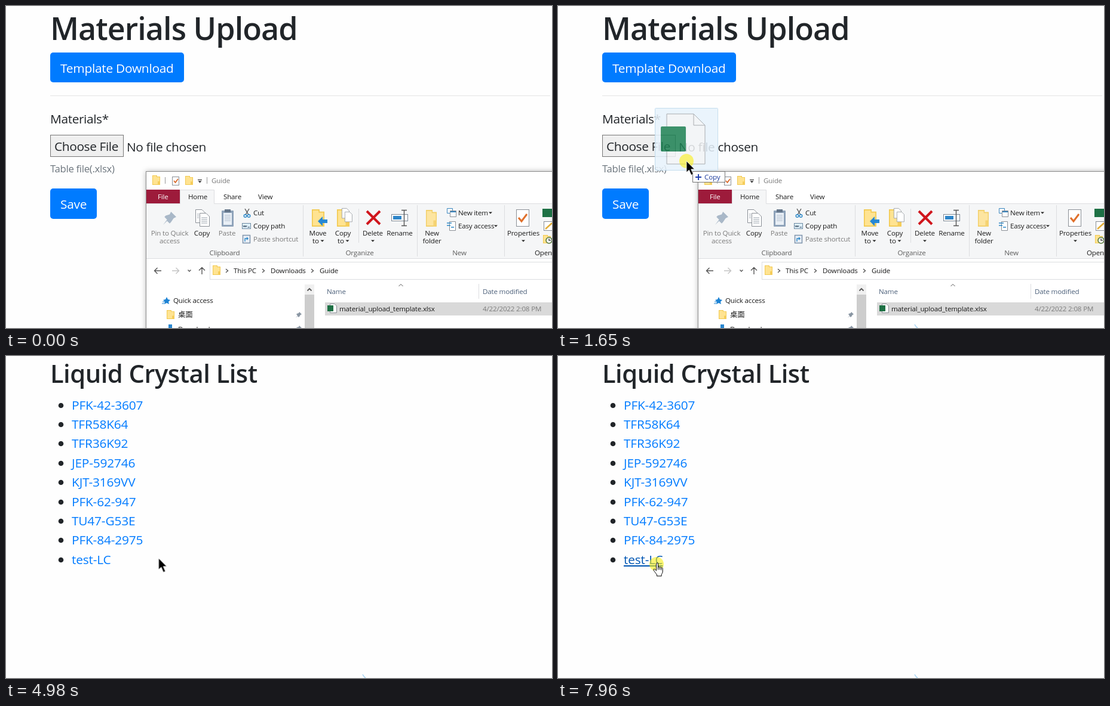
Write an HTML page that moves like this. It is 914x540 px and loops after 8000 ms.

```html
<!DOCTYPE html>
<html lang="en">
<head>
<meta charset="utf-8">
<title>Materials Upload</title>
<style>
  html, body { margin: 0; width: 100%; height: 100%; overflow: hidden; background: #fefefe; }
  svg { display: block; }
  body > svg { width: 100vw; height: 100vh; }
  text { font-family: "Open Sans", "Noto Sans", "Noto Sans CJK SC", "Noto Sans CJK", sans-serif; white-space: pre; }

  .page text { font-size: 20.85px; letter-spacing: -.018em; fill: #212529; }
  .page .title { font-size: 52px; font-weight: 600; }
  .page .subtitle { font-size: 41.7px; font-weight: 600; letter-spacing: -.012em; }
  .page .hint { font-size: 16.7px; fill: #6c757d; }
  .page .label { fill: #fff; letter-spacing: -.012em; }
  .page .link { fill: #007bff; letter-spacing: -.008em; }
  .btn { fill: #007bff; }

  .win text, .tag text { font-size: 11.6px; letter-spacing: -.016em; fill: #1b1b1b; }
  .win .mid { text-anchor: middle; }
  .win .dim { fill: #7b7b7b; }
  .win .group { fill: #5c5c5c; text-anchor: middle; }
  .win .head { fill: #4c607a; }
  .line { fill: none; stroke: #dcdde0; }
  .ink { fill: none; stroke: #555; stroke-width: 1.4; }
  .blue { fill: none; stroke: #2b88c8; stroke-width: 1.4; }
  .sheet { fill: #fff; stroke: #8a8f96; }
  .frame { fill: #fff; stroke: #8b8b8b; filter: drop-shadow(0 0 4px rgba(0, 0, 0, .28)); }

  /* Pointer */
  .pointer { animation: path 8s ease-in-out infinite; }
  @keyframes path {
    0%, 4.1% { transform: translate(598px, 545px); }
    8.375%, 13.1% { transform: translate(580px, 504px); }
    20.6% { transform: translate(215px, 260px); }
    21.5% { transform: translate(218px, 247px); }
    24.1%, 30.7% { transform: translate(233px, 220px); }
    30.71%, 34.75% { transform: translate(232px, 225px); }
    43%, 57.1% { transform: translate(117px, 345px); }
    66.5% { transform: translate(354px, 335px); }
    70% { transform: translate(250px, 368px); }
    74% { transform: translate(150px, 345px); }
    77.1%, 77.75% { transform: translate(181px, 337px); }
    80% { transform: translate(183px, 386px); }
    84% { transform: translate(168px, 345px); }
    85.5% { transform: translate(168px, 312px); }
    87.4% { transform: translate(160px, 335px); }
    91% { transform: translate(150px, 356px); }
    97.75%, 100% { transform: translate(165px, 349px); }
  }

  /* Hard switches */
  .arrow, .hand, .press, .ghost, .tag, .win, .row, .choose, .empty, .chosen,
  .upload, .list, .save, .link1, .link2, .spark { animation: 8s step-end infinite; }
  .arrow { animation-name: arrow; }
  .hand { animation-name: hand; }
  .press { animation-name: press; }
  .ghost { animation-name: ghost; }
  .tag { animation-name: tag; }
  .win, .empty { animation-name: before; }
  .chosen { animation-name: after; }
  .row { animation-name: row; }
  .choose { animation-name: choose; }
  .upload { animation-name: upload; }
  .list { animation-name: list; }
  .save { animation-name: save; }
  .link1 { animation-name: link1; }
  .link2 { animation-name: link2; }
  .spark { animation-name: spark; }
  .ring { animation: ring 8s linear infinite; }

  @keyframes arrow {
    0%, 60.2%, 76.3% { opacity: 1; }
    39.7%, 72.6%, 82.4%, 100% { opacity: 0; }
  }
  @keyframes hand {
    0%, 60.2%, 76.3% { opacity: 0; }
    39.7%, 72.6%, 82.4%, 100% { opacity: 1; }
  }
  @keyframes press {
    0%, 30.7%, 52.1% { opacity: 0; }
    11.85%, 48.7%, 98.6%, 100% { opacity: 1; }
  }
  @keyframes ghost { 0%, 30.7%, 100% { opacity: 0; } 13.6% { opacity: 1; } }
  @keyframes tag { 0%, 100% { opacity: 0; } 18.8% { opacity: 1; } }
  @keyframes before { 0% { opacity: 1; } 30.7%, 100% { opacity: 0; } }
  @keyframes after { 0% { opacity: 0; } 30.7%, 100% { opacity: 1; } }
  @keyframes row {
    0%, 14.3%, 100% { fill: #d9d9d9; stroke: #d9d9d9; }
    6.5% { fill: #cce8ff; stroke: #99d1ff; }
  }
  @keyframes choose {
    0%, 30.7%, 100% { fill: #efefef; stroke: #767676; }
    21.5% { fill: #f5f5f5; stroke: #8d8d8d; }
  }
  @keyframes upload { 0% { opacity: 1; } 57.1%, 100% { opacity: 0; } }
  @keyframes list { 0% { opacity: 0; } 57.1%, 100% { opacity: 1; } }
  @keyframes save { 0% { fill: #007bff; } 39.7%, 100% { fill: #0069d9; } }
  @keyframes ring { 0%, 48.8% { opacity: 0; } 51%, 100% { opacity: 1; } }
  @keyframes link1 {
    0%, 86.6%, 100% { fill: #007bff; text-decoration: none; }
    84.9% { fill: #0056b3; text-decoration: underline; }
  }
  @keyframes link2 {
    0%, 60.2%, 76.3%, 84.9% { fill: #007bff; text-decoration: none; }
    57.1%, 72.6%, 82.4%, 86.6%, 100% { fill: #0056b3; text-decoration: underline; }
  }
  @keyframes spark { 0% { opacity: 0; } 8.4%, 100% { opacity: 1; } }
</style>
</head>
<body>
<svg viewBox="0 0 914 540">
  <defs>
    <symbol id="folder" viewBox="0 0 13 16" preserveAspectRatio="none">
      <path d="M0 0H8V2H13V16H0Z" fill="#f2c94f"/>
      <path d="M1 1H7V3H12V15H1Z" fill="#ffe391"/>
      <path d="M9 10H13V16H9Z" fill="#f5cd5b"/>
    </symbol>
    <path id="down" d="M-3 -1.5H3L0 1.5Z" fill="#222"/>
    <path id="next" d="M-2 -3L1.5 0L-2 3" class="ink"/>
    <path id="pin" d="M1 -5L5 -1L3 0L1 3L0 4L-2 2L-5 5L-2 1L-4 -1L-3 -2L0 -3Z"/>
    <g id="file">
      <path d="M4.500 .5H12L15.500 4V15.500H4.500Z" class="sheet"/>
      <rect y="3" width="10" height="10" fill="#1e7145"/>
    </g>
    <path id="page" d="M.5 .5H11L16.500 6V22.500H.5Z" class="sheet"/>
  </defs>

  <g class="page upload">
    <text class="title" x="74" y="57">Materials Upload</text>
    <rect class="btn" x="74" y="78" width="224" height="50" rx="5"/>
    <text class="label" x="91" y="112">Template Download</text>
    <path d="M74 150.500H911" stroke="#e4e4e4"/>
    <text x="74" y="197">Materials*</text>
    <rect class="choose" x="74.500" y="216.500" width="122" height="36" fill="#efefef" stroke="#767676"/>
    <text x="81" y="243">Choose File</text>
    <text class="empty" x="202" y="244">No file chosen</text>
    <text class="chosen" x="202" y="244">material_upload_template.xlsx</text>
    <text class="hint" x="74" y="279">Table file(.xlsx)</text>
    <rect class="ring" x="69.700" y="301.700" width="86.600" height="59.600" rx="9" fill="#93c7ff"/>
    <rect class="btn save" x="74" y="306" width="78" height="51" rx="5"/>
    <text class="label" x="91" y="340">Save</text>
  </g>

  <g class="page list">
    <text class="subtitle" x="74" y="45">Liquid Crystal List</text>
    <path d="M92 83v0M92 115v0M92 147v0M92 180v0M92 212v0M92 245v0M92 277v0M92 309v0M92 342v0"
      stroke="#212529" stroke-width="8.600" stroke-linecap="round"/>
    <text class="link" x="110" y="90">PFK-42-3607</text>
    <text class="link" x="110" y="122">TFR58K64</text>
    <text class="link" x="110" y="154">TFR36K92</text>
    <text class="link" x="110" y="187">JEP-592746</text>
    <text class="link" x="110" y="219">KJT-3169VV</text>
    <text class="link" x="110" y="252">PFK-62-947</text>
    <text class="link" x="110" y="284">TU47-G53E</text>
    <text class="link link1" x="110" y="316">PFK-84-2975</text>
    <text class="link link2" x="110" y="349">test-LC</text>
  </g>

  <g class="win">
    <rect class="frame" x="234.500" y="277.500" width="720" height="300"/>

    <!-- Title bar -->
    <use href="#folder" x="245" y="284" width="13" height="16"/>
    <path d="M266.500 287V298M336.500 287V298" stroke="#999"/>
    <rect x="278.500" y="286.500" width="11" height="14" class="sheet"/>
    <path d="M281 293L283.500 296L288 290" fill="none" stroke="#d9692a" stroke-width="1.800"/>
    <use href="#folder" x="300" y="285" width="13" height="15"/>
    <path d="M321 291.500H328" stroke="#222"/>
    <use href="#down" x="324.500" y="295"/>
    <text class="dim" x="344" y="297">Guide</text>

    <!-- Tabs -->
    <path d="M235 331H914V424H235Z" fill="#f5f6f7"/>
    <path d="M235 331.500H291.500V308.500H348.500V331.500H914M235 423.500H914" class="line"/>
    <path d="M292 309H348V333H292Z" fill="#f5f6f7"/>
    <path d="M235 308H291V331H235Z" fill="#9d1b3b"/>
    <text x="254" y="324" style="fill:#fff">File</text>
    <text x="305" y="324">Home</text>
    <text x="364" y="324">Share</text>
    <text x="422" y="324">View</text>
    <path d="M497.500 334V420M590.500 340V397M688.500 334V420M834.500 334V420" class="line"/>

    <!-- Clipboard -->
    <use href="#pin" transform="translate(274 356) scale(2.200)" fill="#a9b8c8"/>
    <text class="mid dim" x="274" y="385">Pin to Quick</text>
    <text class="mid dim" x="274" y="398">access</text>
    <use href="#page" x="317" y="341"/>
    <use href="#page" x="324" y="347"/>
    <path d="M320 349H323M320 352H323M320 355H323M327 355H337M327 358H337M327 361H337M327 364H337" stroke="#9aa3ad"/>
    <text class="mid" x="328" y="385">Copy</text>
    <rect x="361" y="343" width="20" height="27" rx="1" fill="#8fa3ba"/>
    <rect x="364" y="347" width="14" height="20" fill="#e9eff6"/>
    <rect x="366" y="341" width="10" height="5" fill="#65768a"/>
    <path d="M366 351H376M366 354H376M366 357H376M366 360H376" stroke="#aebccc"/>
    <text class="mid dim" x="370" y="385">Paste</text>
    <path d="M400 340L406 350M407 340L401 350" class="ink"/>
    <circle cx="400.500" cy="352" r="2.300" class="blue"/>
    <circle cx="406.500" cy="352" r="2.300" class="blue"/>
    <text x="414" y="351">Cut</text>
    <rect x="395.500" y="364.500" width="14" height="9" fill="#dff0fb" stroke="#6f8ba3"/>
    <path d="M397 368L398.500 371L400 368L401.500 371L403 368M404.500 371H408" fill="none" stroke="#24384c"/>
    <text x="414" y="373">Copy path</text>
    <rect x="396.500" y="384.500" width="12" height="13" fill="#e9eff6" stroke="#8095ad" stroke-width="1.500"/>
    <path d="M400 395V390H405M403 388L405 390L403 392" class="blue"/>
    <text class="dim" x="414" y="395">Paste shortcut</text>
    <text class="group" x="366" y="418">Clipboard</text>

    <!-- Organize -->
    <use href="#folder" x="512" y="341" width="21" height="29"/>
    <path d="M522 361L530 353V358H538V364H530V369Z" fill="#2688d4"/>
    <text class="mid" x="522" y="385">Move</text>
    <text x="513" y="398">to</text>
    <use href="#down" x="529.500" y="394"/>
    <use href="#folder" x="554" y="341" width="21" height="29"/>
    <use href="#page" transform="translate(562 339) scale(.75)"/>
    <use href="#page" transform="translate(567 345) scale(.75)"/>
    <text class="mid" x="564" y="385">Copy</text>
    <text x="555" y="398">to</text>
    <use href="#down" x="571.500" y="394"/>
    <path d="M604 344L626 366M626 344L604 366" stroke="#d0151c" stroke-width="4"/>
    <text class="mid" x="614" y="385">Delete</text>
    <use href="#down" x="614" y="394"/>
    <rect x="645.500" y="349.500" width="27" height="11" fill="#fff" stroke="#7c8894"/>
    <rect x="648" y="352" width="14" height="6" fill="#2f86c9"/>
    <path d="M662 342.500H671M662 368.500H671M666.500 342V369" class="ink"/>
    <text class="mid" x="659" y="385">Rename</text>
    <text class="group" x="592" y="418">Organize</text>

    <!-- New -->
    <use href="#folder" x="703" y="342" width="18" height="28" opacity=".85"/>
    <text class="mid" x="713" y="385">New</text>
    <text class="mid" x="713" y="398">folder</text>
    <path d="M738.500 339.500H747.500V347.500H738.500Z" fill="#fff" stroke="#3a86bf"/>
    <path d="M743.500 343.500H753.500V353.500H743.500Z" class="sheet"/>
    <path d="M744 345H753" stroke="#3a86bf" stroke-width="2"/>
    <text x="757" y="351">New item</text>
    <use href="#down" x="811" y="347"/>
    <path d="M742.500 361.500H752.500V376.500H742.500Z" class="sheet"/>
    <path d="M738 364H746M738 368H744M745 371H750" class="blue"/>
    <text x="757" y="373">Easy access</text>
    <use href="#down" x="820" y="369"/>
    <text class="group" x="759" y="418">New</text>

    <!-- Open -->
    <rect x="854.500" y="341.500" width="21" height="28" class="sheet"/>
    <path d="M858 355L863 361L872 349" fill="none" stroke="#e0702c" stroke-width="3"/>
    <text class="mid" x="866" y="385">Properties</text>
    <use href="#down" x="866" y="394"/>
    <rect x="898" y="340" width="16" height="14" fill="#1e7145"/>
    <rect x="900.500" y="361.500" width="14" height="15" class="sheet"/>
    <path d="M903 374L914 364" stroke="#e3ad35" stroke-width="2.500"/>
    <use href="#folder" x="899" y="384" width="13" height="14"/>
    <circle cx="909" cy="393" r="5" fill="#f5f6f7" stroke="#55783b" stroke-width="1.500"/>
    <path d="M909 390V393H912" class="ink"/>
    <text x="885" y="418">Open</text>

    <!-- Address -->
    <path d="M260 444H249M253.500 439L248.500 444L253.500 449M328 450V439M323 443.500L328 438.500L333 443.500" class="ink"/>
    <path d="M278 444H289M284.500 439L289.500 444L284.500 449" class="ink" opacity=".35"/>
    <path d="M304.500 442.500L307 445L309.500 442.500" class="ink"/>
    <rect x="341.500" y="429.500" width="600" height="29" class="line"/>
    <use href="#folder" x="346" y="435" width="13" height="16"/>
    <use href="#next" x="370" y="444"/>
    <text x="381" y="448">This PC</text>
    <use href="#next" x="431" y="444"/>
    <text x="443" y="448">Downloads</text>
    <use href="#next" x="513" y="444"/>
    <text x="525" y="448">Guide</text>

    <!-- Side pane -->
    <path d="M269 488L271 492L275 493L272 496L273 500L269 498L265 500L266 496L263 493L267 492Z" fill="#1d83d4"/>
    <path d="M262 496H266M261 499H265" stroke="#1d83d4"/>
    <text x="280" y="498">Quick access</text>
    <use href="#folder" x="269" y="510" width="13" height="15"/>
    <text x="288" y="522" style="font-size:12.500px">桌面</text>
    <use href="#pin" x="490" y="518" fill="#8a96a3"/>
    <path d="M272 534H278V541H272Z" fill="#2a87d0"/>
    <text x="288" y="546">Downloads</text>
    <use href="#pin" x="490" y="541" fill="#8a96a3"/>
    <path d="M500 467H516V540H500Z" fill="#f0f0f0"/>
    <path d="M500 484H516V540H500Z" fill="#cdcdcd"/>
    <path d="M504.500 477.500L508 474L511.500 477.500" class="ink" style="stroke-width:1.800"/>

    <!-- File list -->
    <text class="head" x="537" y="483">Name</text>
    <path d="M657.500 470L661 466.500L664.500 470" class="ink" style="stroke-width:1"/>
    <path d="M791.500 466V491" class="line"/>
    <text class="head" x="798" y="483">Date modified</text>
    <rect class="row" x="534.500" y="497.500" width="400" height="21" fill="#d9d9d9" stroke="#d9d9d9"/>
    <use href="#file" x="538" y="499"/>
    <text x="558" y="512">material_upload_template.xlsx</text>
    <text class="dim" x="798" y="512">4/22/2022 2:08 PM</text>
  </g>

  <path class="spark" d="M597 534Q599 538 602 540" fill="none" stroke="#a9d5f3" stroke-width="1.600"/>

  <g class="pointer">
    <g class="ghost">
      <g opacity=".86">
        <rect x="-52.500" y="-88.500" width="105" height="104" rx="1" fill="#e7f3fc" stroke="#bcd9ec"/>
        <path d="M-33 -79H12L31 -60V5H-33Z" fill="#f1f4f6" stroke="#9a9fa3"/>
        <path d="M12 -79V-60H31" fill="none" stroke="#9a9fa3"/>
        <rect x="-43" y="-58" width="42" height="42" rx="2" fill="#1e8053"/>
      </g>
      <g class="tag">
        <rect x="10.500" y="17.500" width="54" height="18" fill="#fff" stroke="#707070"/>
        <path d="M15 27H25M20 22V32" stroke="#1f3fae" stroke-width="2"/>
        <text x="30" y="31" style="fill:#1b3a9c">Copy</text>
      </g>
    </g>
    <circle class="press" r="12" fill="#faee14" fill-opacity=".6"/>
    <path class="arrow" d="M0 0V19L4.400 15L8 23.500L11.300 22L7.800 13.800H13.500Z" stroke="#fff" stroke-width=".8"/>
    <path class="hand" transform="translate(-6 -2.500)" fill="#fff" stroke="#000" stroke-linejoin="round"
      d="M5.500 13.500V2a1.500 1.500 0 0 1 3 0V8a1.350 1.300 0 0 1 2.700 .6a1.300 1.300 0 0 1 2.600 .7a1.200 1.200 0 0 1 2.400 .8V15q0 3 -2 4.500V22.500H6.500V20Q4.500 18 3 15.500L.9 12.500q-.4 -1.600 1.200 -1.600Q3.500 11 5.500 13.500ZM8.500 8V12M11.200 8.600V12M13.800 9.300V12.500"/>
  </g>
</svg>
</body>
</html>
```
